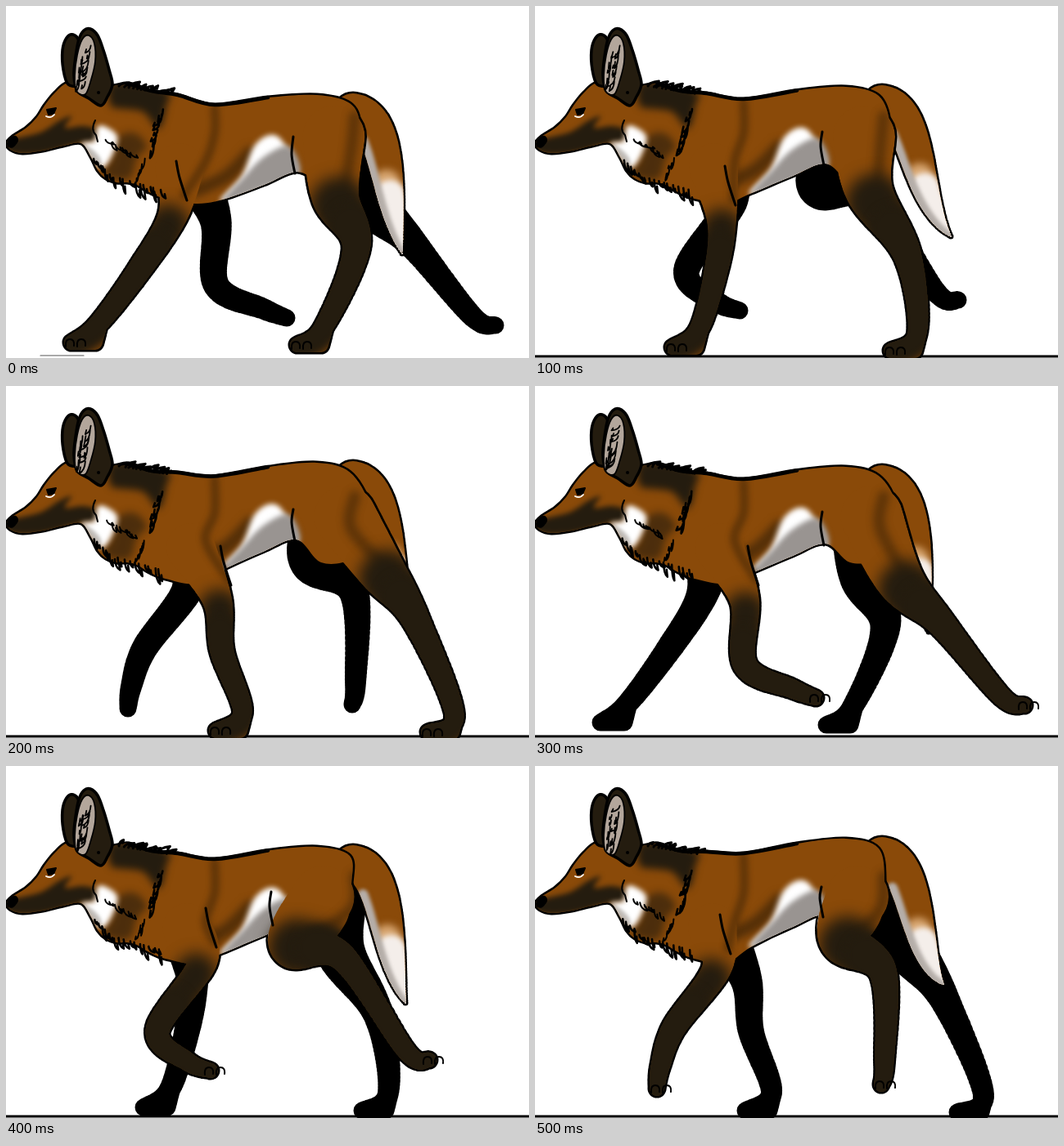
Animation of 639x431 px, one loop 0.6 s. Source, as an HTML page:

```html
<!DOCTYPE html>
<html lang="en">
<head>
<meta charset="utf-8">
<title>Walking maned wolf</title>
<style>
html, body { margin: 0; width: 100%; height: 100%; overflow: hidden; background: #fff; }
svg { display: block; width: 100%; height: 100%; }
</style>
</head>
<body>
<svg id="stage" viewBox="0 0 639 431" fill="none" stroke-linecap="round" stroke-linejoin="round"></svg>
<script>
const COAT = '#8a4a09', DARK = '#241c0f', SHADE = '#542f08', GRAY = '#999491';
const STEP = 100, COUNT = 6;

// Joints by phase of the stride: three planted, two trailing, one reaching.
// The far legs run the same cycle half a stride later.
const HIND = {
  root: [400, 160], radii: [38, 29, 17, 11.5, 9],
  joints: [
    '402,232 428,295 388,393', '408,226 455,305 467,400', '458,225 500,285 548,402',
    '446,238 496,290 570,380', '350,218 411,234 489,349', '376,212 425,252 427,363'
  ]
};
const FORE = {
  root: [215, 198], radii: [30, 18, 14.5, 11.5, 9],
  joints: [
    '204,256 165,320 112,390', '228,262 222,320 200,396', '258,262 264,325 289,400',
    '256,262 257,342 315,371', '240,240 185,324 222,362', '222,248 170,320 153,368'
  ]
};
const TAIL_TIPS = '484,303 508,282 496,290 481,301 488,290 499,267';
const LIFT = [0, 10, 15, 10, 10, 20];

// Chest, throat, muzzle, brow and nape.
const HEAD = `160,219 148,216 135,216 122,211 112,201 104,185 92,168 70,171 45,177 20,180 6,176 1,168
  8,160 25,149 38,136 47,122 60,106 76,94 100,98 130,98`;
const EAR_FAR = '76,96 70,78 69,54 74,39 82,35 89,43 92,70 88,95';
const EAR_NEAR = '87,104 83,85 85,62 89,41 95,30 103,28 112,36 119,54 126,78 130,96 124,111 116,122 101,113';
const EAR_IN = '86,104 84,85 87,60 93,41 101,36 108,46 109,68 104,90 97,108';

const points = s => Array.isArray(s) ? s : s.trim().split(/\s+/).map(p => p.split(',').map(Number));
const mix = (a, b, k) => a.map((v, i) => v + (b[i] - v) * k);

// Smooth curve through the given points.
function curve(s, closed) {
  const p = points(s), n = p.length;
  const at = i => closed ? p[(i + n) % n] : p[Math.max(0, Math.min(n - 1, i))];
  let d = 'M' + p[0];
  for (let i = 0; i < (closed ? n : n - 1); i++) {
    const [a, b, c, e] = [at(i - 1), at(i), at(i + 1), at(i + 2)];
    const u = b.map((v, k) => v + (c[k] - a[k]) / 6);
    const w = c.map((v, k) => v - (e[k] - b[k]) / 6);
    d += `C${u} ${w} ${c}`;
  }
  return d + (closed ? 'Z' : '');
}

const path = (d, attrs = '') => `<path d="${d}" ${attrs}/>`;
const fill = (d, color, attrs = '') => path(d, `fill="${color}" ${attrs}`);
const outline = d => path(d, 'stroke="#000" stroke-width="5"');
const area = (s, color, attrs) => fill(curve(s, true), color, attrs);
const line = (s, width, color = '#000', attrs = '') =>
  path(curve(s), `stroke="${color}" stroke-width="${width}" ${attrs}`);
const blur = n => `filter="url(#blur${n})"`;

// A tapered shape is a chain of discs [x, y, radius].
const chain = (discs, grow = 0) => discs.map(([x, y, r0]) => {
  const r = (r0 + grow).toFixed(1);
  return `M${(x - r).toFixed(1)} ${y.toFixed(1)}a${r} ${r} 0 1 0 ${2 * r} 0a${r} ${r} 0 1 0 ${-2 * r} 0`;
}).join('');

function spline(p, u) {
  const i = Math.min(Math.floor(u), p.length - 2), t = u - i;
  const [a, b, c, e] = [p[Math.max(i - 1, 0)], p[i], p[i + 1], p[Math.min(i + 2, p.length - 1)]];
  return b.map((v, k) => v + t / 2 * (c[k] - a[k] +
    t * (2 * a[k] - 5 * v + 4 * c[k] - e[k] + t * (3 * (v - c[k]) + e[k] - a[k]))));
}

const sway = joint => (joint[0] - 410) * 0.2;

function limb(kind, phase) {
  const [upper, middle, ankle] = points(kind.joints[phase]);
  const planted = phase < 3;
  const [dx, dy] = planted ? [-32, 22] : phase < 5 ? [28, 11] : [-4, 27];
  const toe = [ankle[0] + dx, ankle[1] + dy];
  const root = [kind.root[0] + (upper[0] - kind.root[0]) * 0.25, kind.root[1]];
  const bones = [root, upper, middle, ankle, toe].map((p, i) => [...p, kind.radii[i]]);
  const discs = [], dark = [];
  for (let u = 0; u <= 4; u += 0.05) {
    const disc = spline(bones, u);
    discs.push(disc);
    if (u > 1.2) dark.push(disc);
  }
  if (planted) {
    const heel = [ankle[0] - 3, toe[1], 9];
    for (let k = 0; k <= 1; k += 0.1) discs.push(mix(bones[4], heel, k), mix(bones[3], heel, k));
  }
  return { upper, toe, discs, dark };
}

function tailDiscs(tip, lift) {
  const [a, b, c] = [[424, 130 - lift], [469, 136 - lift], [463, 235]];
  return Array.from({ length: 61 }, (_, i) => {
    const t = i / 60, s = 1 - t;
    const [x, y] = a.map((v, k) => s ** 3 * v + 3 * s * s * t * b[k] + 3 * s * t * t * c[k] + t ** 3 * tip[k]);
    return [x, y, 1 + 22 * (1 - t ** 3)];
  });
}

function random(seed) {
  return () => (seed = (seed * 16807) % 2147483647) / 2147483647;
}

// Row of ragged fur strokes between two points, each leaning by (dx, dy).
function fur(rnd, from, to, count, dx, dy, width = 2.6) {
  let d = '';
  for (let i = 0; i < count; i++) {
    const [x, y] = mix(from, to, (i + rnd() * 0.6) / count);
    const sx = dx * (0.5 + rnd()), sy = dy * (0.5 + rnd());
    d += `M${x} ${y}q${sx * 0.1} ${sy * 0.8} ${sx} ${sy}l${-sx * 0.2} ${-sy * 0.5}`;
  }
  return path(d, `stroke="#000" stroke-width="${width}"`);
}

const headTones = () =>
  area('128,96 160,94 198,106 196,122 187,150 168,130 145,126 128,122', DARK, blur(5)) +
  area('138,160 158,156 172,172 160,186 152,210 132,212 118,203 128,190', DARK, blur(5) + ' opacity=".6"') +
  area('0,166 22,160 44,154 66,140 80,135 72,149 94,147 110,152 108,165 90,168 45,180 8,180', DARK, blur(3)) +
  area('93,169 108,165 112,148 122,148 136,160 130,182 118,198 106,188', '#fff', blur(3)) +
  area('92,168 106,176 116,188 113,199 104,186', '#aaa5a0', blur(2) + ' opacity=".7"');

function headLines(rnd) {
  return area('1,168 5,161 12,159 15,165 9,173 3,173', '#000') +
    path('M50 127l11-2-3 7-6 1z', 'fill="#000" stroke="#000" stroke-width="2"') +
    path('M49 135q6 3 10-2', 'stroke="#fff" stroke-width="1.8"') +
    path('M109 140q-6 12 1 18l2 8', 'stroke="#000" stroke-width="2"') +
    area(EAR_FAR, DARK, 'stroke="#000" stroke-width="3.5"') +
    area(EAR_NEAR, DARK, 'stroke="#000" stroke-width="3.5"') +
    area(EAR_IN, '#b3a69b', 'stroke="#000" stroke-width="1.8"') +
    fur(rnd, [104, 46], [96, 98], 8, -7, 11, 1.8) +
    fur(rnd, [94, 58], [89, 96], 5, -3, 10, 1.8) +
    path('M113 106h.1', 'stroke="#000" stroke-width="4"');
}

const mane = rnd =>
  fur(rnd, [138, 98], [200, 108], 12, 10, -5, 3) +
  fur(rnd, [106, 186], [135, 214], 6, 5, 11) +
  fur(rnd, [136, 210], [192, 226], 9, 5, 13) +
  fur(rnd, [192, 126], [180, 172], 8, -6, 12) +
  fur(rnd, [120, 163], [155, 181], 6, 8, 8, 2) +
  fur(rnd, [170, 186], [160, 210], 4, -4, 10, 2);

// Trunk points sink or rise with the lift of the back.
function trunk(lift, s) {
  return [[150, 95], [178, 104], [210, 109 - lift * 0.2], [255, 121 - lift * 0.7], [320, 112 - lift * 0.85],
    [380, 109 - lift], [420, 119 - lift * 0.9], [434 + s, 145], [430 + s, 185], [412 + s, 212], [385, 216],
    [355, 203 - lift], [315, 219 - lift * 1.1], [265, 237 - lift * 0.8], [232, 242], [195, 236], [175, 228]];
}

function drawTail(i, lift) {
  const discs = tailDiscs(points(TAIL_TIPS)[i], lift);
  const shape = chain(discs);
  const inner = (from, shift) => curve(discs.slice(from).filter((_, k) => k % 5 === 0)
    .map(([x, y, r]) => [x - shift * r, y + 3]));
  const streak = (from, shift, width, color, soft) =>
    path(inner(from, shift), `stroke="${color}" stroke-width="${width}" ${blur(soft)}`);
  return `<clipPath id="tail${i}">${path(shape)}</clipPath>` + outline(shape) + fill(shape, COAT) +
    `<g clip-path="url(#tail${i})">` + streak(36, 0.1, 34, '#d9a873', 5) + streak(40, 0, 38, '#f4eeea', 3) +
    streak(20, 0.85, 13, '#b5aea9', 2) + '</g>';
}

function toes([x, y]) {
  return path([-3, 11].map(dx => `M${x + dx - 4} ${y + 5}q-1-9 5-9t5 8`).join(''),
    'stroke="#000" stroke-width="2"');
}

function drawPose(_, i) {
  const rnd = random(97 + i * 31), lift = LIFT[i];
  const kinds = [HIND, FORE];
  const far = kinds.map(k => limb(k, (i + 3) % COUNT));
  const near = kinds.map(k => limb(k, i));
  const [knee, elbow] = near.map(l => l.upper);
  const torso = trunk(lift, sway(knee));
  const body = curve([...points(HEAD), ...torso], true);
  const legs = near.map(l => chain(l.discs));
  const raise = (s, amount) => points(s).map(([x, y]) => [x, y - lift * amount]);
  const flank = Math.min(350, knee[0] - 27);
  const shoulder = [[255, 126 - lift * 0.7], [255, 155], [244, 190], [elbow[0] + 14, elbow[1] - 25]];

  let out = i ? path('M0 429H639', 'stroke="#000" stroke-width="3"')
    : path('M42 428H95', 'stroke="#555" stroke-width="1.2"');
  out += far.map(l => fill(chain(l.discs, 1.5), '#000')).join('');
  out += drawTail(i, lift);
  out += `<clipPath id="body${i}">${[body, ...legs].map(d => path(d)).join('')}</clipPath>`;
  out += [body, ...legs].map(outline).join('') + fill(body, COAT);
  out += `<g clip-path="url(#body${i})">`;
  out += line(raise('232,226 270,208 298,180', 0.8), 16, SHADE, blur(5));
  out += area(raise('262,240 288,208 303,172 322,158 338,166 356,206 315,223', 0.9), '#fff', blur(3));
  out += area(raise('265,240 290,210 316,184 346,172 358,206 315,223', 0.95), GRAY, blur(3));
  out += legs.map(d => fill(d, COAT)).join('');
  out += line(shoulder, 11, SHADE, blur(3) + ' opacity=".7"');
  out += line([[426, 135], [422, 175], [knee[0] + 10, knee[1]]], 14, SHADE, blur(5) + ' opacity=".8"');
  out += near.map(l => fill(chain(l.dark, 9), DARK, blur(9)) + fill(chain(l.dark.slice(8), 6), DARK, blur(5))).join('');
  out += headTones() + '</g>';
  out += line(torso.slice(0, 5), 4.5);
  out += line([[flank + 1, 160 - lift * 0.6], [flank - 1, 182 - lift], [flank + 3, 205 - lift]], 3);
  out += line([[elbow[0] + 4, elbow[1] - 66], [elbow[0] + 8, elbow[1] - 46], [elbow[0] + 17, elbow[1] - 18]], 3);
  return out + mane(rnd) + headLines(rnd) + near.map(l => toes(l.toe)).join('');
}

const stage = document.getElementById('stage');
const filters = [2, 3, 5, 9].map(n =>
  `<filter id="blur${n}" filterUnits="userSpaceOnUse" x="-40" y="-40" width="719" height="511"
    color-interpolation-filters="sRGB"><feGaussianBlur stdDeviation="${n}"/></filter>`);
stage.innerHTML = `<defs>${filters.join('')}</defs>` + Array.from({ length: COUNT }, drawPose)
  .map(pose => `<g class="pose" visibility="hidden">${pose}</g>`).join('');

const poses = [...stage.querySelectorAll('.pose')];
const start = performance.now();
let shown = -1;

function update() {
  const now = Math.floor((performance.now() - start) / STEP) % COUNT;
  if (now !== shown) {
    poses.forEach((g, i) => g.setAttribute('visibility', i === now ? 'visible' : 'hidden'));
    shown = now;
  }
  requestAnimationFrame(update);
}
update();
</script>
</body>
</html>
```
